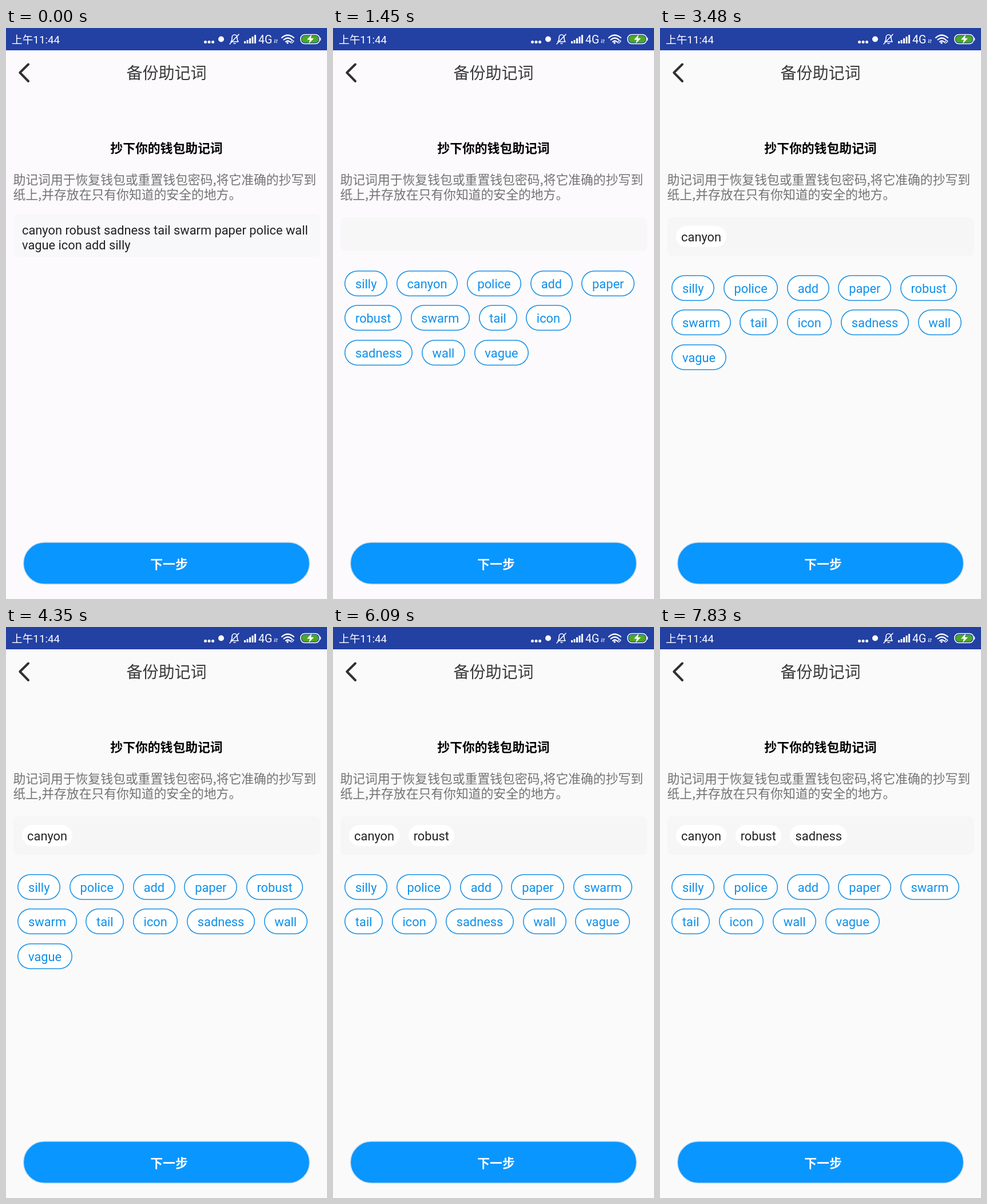
Animation of 561 by 998 pixels, one loop 8 s. Source, as an HTML page:

```html
<!DOCTYPE html>
<html lang="zh-CN">
<head>
<meta charset="utf-8">
<title>备份助记词</title>
<style>
  html, body { margin: 0; width: 100%; height: 100%; overflow: hidden; }
  body { background: #fafafa; }
  #stage {
    position: relative; width: 561px; height: 998px; overflow: hidden;
    font: 21.82px Roboto, "Noto Sans CJK SC", "Noto Sans CJK", sans-serif;
  }
  svg { position: absolute; left: 0; top: 0; }
  .note { font-family: "Noto Sans CJK SC", "Noto Sans CJK", sans-serif; }
  #box {
    position: absolute; left: 12.5px; width: 536px; box-sizing: border-box;
    border-radius: 8px; background: #f6f6f6; color: #222;
  }
  #phrase { position: absolute; left: 15.5px; top: 16px; width: 510px; line-height: 26px; }
  #chosen { position: absolute; left: 15.5px; top: 15px; display: flex; gap: 15.4px; }
  #chosen span {
    height: 37px; line-height: 39px; padding: 0 9.1px;
    border-radius: 18.5px; background: #fff;
  }
  #pool { position: absolute; left: 12.5px; width: 536px; display: flex; flex-wrap: wrap; }
  #pool span {
    height: 45.2px; line-height: 47.5px;
    margin: 0 7.8px 15.6px; padding: 0 18.7px;
    border-radius: 22.6px; box-shadow: inset 0 0 0 1.56px #1b91e4;
    background: #fff; color: #0f8fe8;
  }
</style>
</head>
<body>
<div id="stage">
  <svg width="561" height="998" viewBox="0 0 561 998">
    <rect width="561" height="39" fill="#2340a3"/>
    <g fill="#fff" font-size="18.7">
      <text x="10" y="27">上午11:44</text>
      <text x="441" y="27" font-size="19.5">4G</text>
      <circle cx="348.5" cy="24.5" r="2.5"/>
      <circle cx="355" cy="24.5" r="2.5"/>
      <circle cx="361.5" cy="24.5" r="2.5"/>
      <circle cx="376" cy="19.5" r="5"/>
      <path d="M416 23h3v4h-3zM420.5 21h3v6h-3zM425 18h3v9h-3zM429.5 15h3v12h-3zM434 12h3v15h-3z"/>
    </g>
    <g fill="none" stroke="#fff" stroke-width="1.6" stroke-linecap="round" stroke-linejoin="round">
      <path d="M393 24h13c-2-2-2-4-2-7 0-7-9-7-9 0 0 3 0 5-2 7zM398 27h3M391 28l16-17"/>
      <path stroke-width="1" d="M470 20v6l-1.5-1.5M473 26v-6l1.5 1.5"/>
      <path stroke-width="2.2" d="M482 17q10-9 21 0M485.5 20.5q7-6 14 0M489 24q3.5-3 7 0"/>
      <circle cx="492" cy="26" r="1"/>
      <path stroke-width="1.2" d="M497 25l3-3q2-1 3 1l-3 3q-2 1-3-1"/>
    </g>
    <rect x="515" y="11.5" width="33" height="16" rx="7" fill="#2340a3" stroke="#fff" stroke-width="1.6"/>
    <rect x="517" y="13.5" width="29" height="12" rx="5" fill="#4aaa24"/>
    <path d="M549 16q3 3.5 0 7z" fill="#fff"/>
    <path d="M534 11.5l-8 9h5l-2 7 9-9.5h-5z" fill="#fff"/>

    <path d="M39 63.5L24.3 78 39 93" fill="none" stroke="#303030" stroke-width="4" stroke-linecap="round" stroke-linejoin="round"/>
    <g text-anchor="middle">
      <text x="280.5" y="89.3" font-size="28.05" fill="#3a3a3a">备份助记词</text>
      <text x="280.5" y="218" font-weight="700" fill="#000">抄下你的钱包助记词</text>
    </g>
    <g class="note" fill="#737373">
      <text x="12.5" y="273">助记词用于恢复钱包或重置钱包密码,将它准确的抄写到</text>
      <text x="12.5" y="299">纸上,并存放在只有你知道的安全的地方。</text>
    </g>
    <rect x="30.5" y="899" width="500" height="73" rx="36.5" fill="#0a96ff" stroke="#cbdcea" stroke-width="1.4"/>
    <text x="285" y="944.5" text-anchor="middle" font-weight="700" fill="#fff">下一步</text>
  </svg>
  <div id="box"><div id="phrase"></div><div id="chosen"></div></div>
  <div id="pool"></div>
</div>
<script>
const LOOP = 8000;
const phrase = "canyon robust sadness tail swarm paper police wall vague icon add silly";
const words = phrase.split(" ");
const shuffled = "silly canyon police add paper robust swarm tail icon sadness wall vague".split(" ");

// picked: -1 shows the whole phrase, otherwise the count of chosen words
const steps = [
  { at: 0,    picked: -1, top: 325, height: 75, bg: "#fcfafd", fill: "#f8f7f9" },
  { at: 1160, picked: 0,  top: 331, height: 59, bg: "#fcfafd", fill: "#f7f7f7" },
  { at: 2030, picked: 1,  top: 331, height: 67, bg: "#fcfafd", fill: "#f6f6f6" },
  { at: 2610, picked: 1,  top: 331, height: 67, bg: "#fafafa", fill: "#f6f6f6" },
  { at: 5800, picked: 2,  top: 331, height: 67, bg: "#fafafa", fill: "#f6f6f6" },
  { at: 7540, picked: 3,  top: 331, height: 67, bg: "#fafafa", fill: "#f6f6f6" }
];

const el = id => document.getElementById(id);
const fillChips = (node, list) => node.replaceChildren(...list.map(word => {
  const chip = document.createElement("span");
  chip.textContent = word;
  return chip;
}));

function show({ picked, top, height, bg, fill }) {
  const whole = picked < 0;
  const chosen = whole ? [] : words.slice(0, picked);
  el("stage").style.background = bg;
  Object.assign(el("box").style, { top: top + "px", height: height + "px", background: fill });
  el("phrase").textContent = whole ? phrase : "";
  fillChips(el("chosen"), chosen);
  fillChips(el("pool"), whole ? [] : shuffled.filter(w => !chosen.includes(w)));
  el("pool").style.top = top + height + 33.5 + "px";
}

const start = performance.now();
let current = null;
function tick() {
  const t = (performance.now() - start) % LOOP;
  const step = steps.findLast(s => s.at <= t) || steps[0];
  if (step !== current) show(current = step);
  requestAnimationFrame(tick);
}
tick();
</script>
</body>
</html>
```
